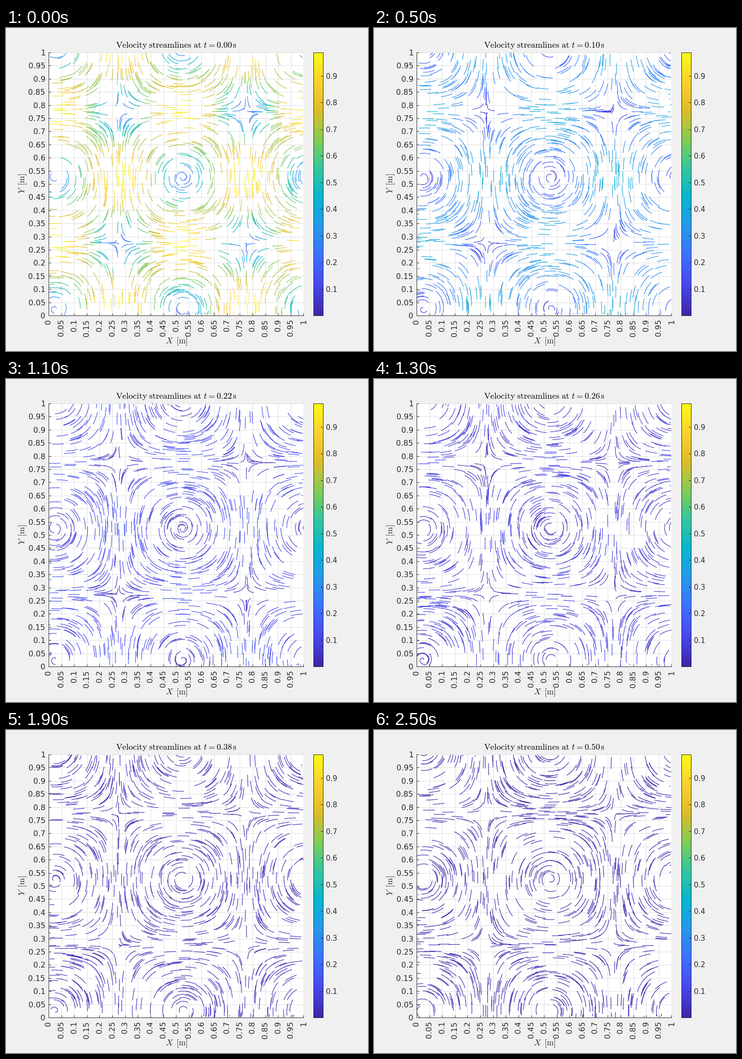
Write a matplotlib script that moves like this. It is 756 by 673 pixels and loops after 2.6 s.

```python
import numpy as np
import matplotlib.pyplot as plt
from matplotlib.animation import FuncAnimation
from matplotlib.collections import LineCollection
from matplotlib.colors import LinearSegmentedColormap

W, H, DPI = 756, 673, 100
FRAMES, INTERVAL, DT = 26, 100, 0.02
CELLS, VERTICES, SEEDS = 20, 10, 1000
CELL = 1 / CELLS
WAVE = 2 * np.pi
PEAK = np.cos(WAVE * CELL / 2)
VISCOSITY = 0.1
DECAY = 1 - 2 * VISCOSITY * WAVE ** 2 * DT  # explicit time step
INK = "#262626"
CMAP = LinearSegmentedColormap.from_list("speed", [
    "#3e26a8", "#4747eb", "#3e6fff", "#2797eb", "#08b5d0",
    "#31c69f", "#81cc59", "#dcbd29", "#fccf30", "#f9fb15"])

plt.rcParams.update({
    "font.family": "DejaVu Sans", "mathtext.fontset": "cm",
    "text.color": INK, "axes.edgecolor": INK,
    "xtick.color": INK, "ytick.color": INK})


def pt(pixels):
    return pixels * 72 / DPI


def pixel_axes(left, top, right, bottom):
    axes = fig.add_axes([left / W, 1 - bottom / H,
                         (right - left) / W, (bottom - top) / H])
    for spine in axes.spines.values():
        spine.set_linewidth(pt(1))
    axes.tick_params(direction="in", length=pt(5), width=pt(1))
    return axes


# Cellular vortices sampled on a coarse grid, centred half a cell off the nodes
nodes = np.arange(CELLS + 1) * CELL
gx, gy = np.meshgrid(WAVE * (nodes - CELL / 2), WAVE * (nodes - CELL / 2))
U = -np.cos(gx) * np.sin(gy)
V = np.sin(gx) * np.cos(gy)
SPEED = np.hypot(U, V)


def sample(pos, *fields):
    """Bilinear interpolation at positions given in cell units."""
    cell = np.clip(np.floor(pos).astype(int), 0, CELLS - 1)
    fx, fy = (pos - cell).T
    i, j = cell.T
    return [(f[j, i] * (1 - fx) + f[j, i + 1] * fx) * (1 - fy)
            + (f[j + 1, i] * (1 - fx) + f[j + 1, i + 1] * fx) * fy
            for f in fields]


def streamlines(frame):
    """Short Euler paths from random seeds, cut into three coloured pieces."""
    rng = np.random.default_rng(100 + frame)
    pos = rng.random((SEEDS, 2)) * CELLS
    path, speed = [], []
    for _ in range(VERTICES):
        u, v, s = sample(pos, U, V, SPEED)
        path.append(pos * CELL)
        speed.append(s)
        step = np.column_stack([u, v])
        step *= 0.1 / np.maximum(np.abs(step).max(axis=1, keepdims=True), 1e-9)
        after = pos + step
        inside = ((after >= 0) & (after <= CELLS)).all(axis=1, keepdims=True)
        pos = np.where(inside, after, pos)
    path, speed = np.stack(path, axis=1), np.stack(speed, axis=1)
    cuts = [slice(k, k + 4) for k in range(0, VERTICES - 1, 3)]
    return (np.concatenate([path[:, c] for c in cuts]),
            np.concatenate([speed[:, c].mean(axis=1) for c in cuts]))


fig = plt.figure(figsize=(W / DPI, H / DPI), dpi=DPI, facecolor="#f0f0f0")

ax = pixel_axes(89, 51, 621.4, 599)
ax.set(xlim=(0, 1), ylim=(0, 1), xticks=nodes, yticks=nodes)
labels = [f"{x:.2f}".rstrip("0").rstrip(".") for x in nodes]
ax.set_xticklabels(labels, rotation=90)
ax.set_yticklabels(labels)
ax.tick_params(labelsize=pt(16), pad=pt(7))
ax.tick_params(axis="x", pad=pt(8))
ax.grid(color="#dedede", linewidth=pt(1))
ax.set_axisbelow(True)
ax.spines[["top", "right"]].set_visible(False)

lines = LineCollection([], cmap=CMAP, linewidths=pt(1.2), capstyle="butt")
lines.set_clim(0, PEAK)
ax.add_collection(lines)

bar = pixel_axes(642, 51, 662, 599)
bar.imshow(np.arange(256)[:, None], cmap=CMAP, origin="lower",
           aspect="auto", extent=(0, 1, 0, PEAK))
bar.set(xticks=[], yticks=np.arange(1, 10) / 10)
bar.yaxis.tick_right()
bar.tick_params(labelsize=pt(15), pad=pt(6.5))


def label(x, y, text, size=17.5, **style):
    style = {"ha": "center", "va": "baseline", **style}
    return fig.text(x / W, 1 - y / H, text, fontsize=pt(size), **style)


title = label(356, 41, "", size=17.9, color="black")
label(356, 657.5, r"$X\ \,\mathrm{[m]}$")
label(46, 324, r"$Y\ \,\mathrm{[m]}$", rotation=90, ha="right", va="center")


def update(frame):
    pieces, tones = streamlines(frame)
    lines.set_segments(pieces)
    lines.set_array(tones * DECAY ** frame)
    title.set_text(r"$\mathrm{Velocity\ streamlines\ at}\ t=%.2f\,\mathrm{s}$"
                   % (frame * DT))
    return lines, title


anim = FuncAnimation(fig, update, frames=FRAMES, interval=INTERVAL,
                     repeat=True, repeat_delay=0, blit=False)
plt.show()
```
